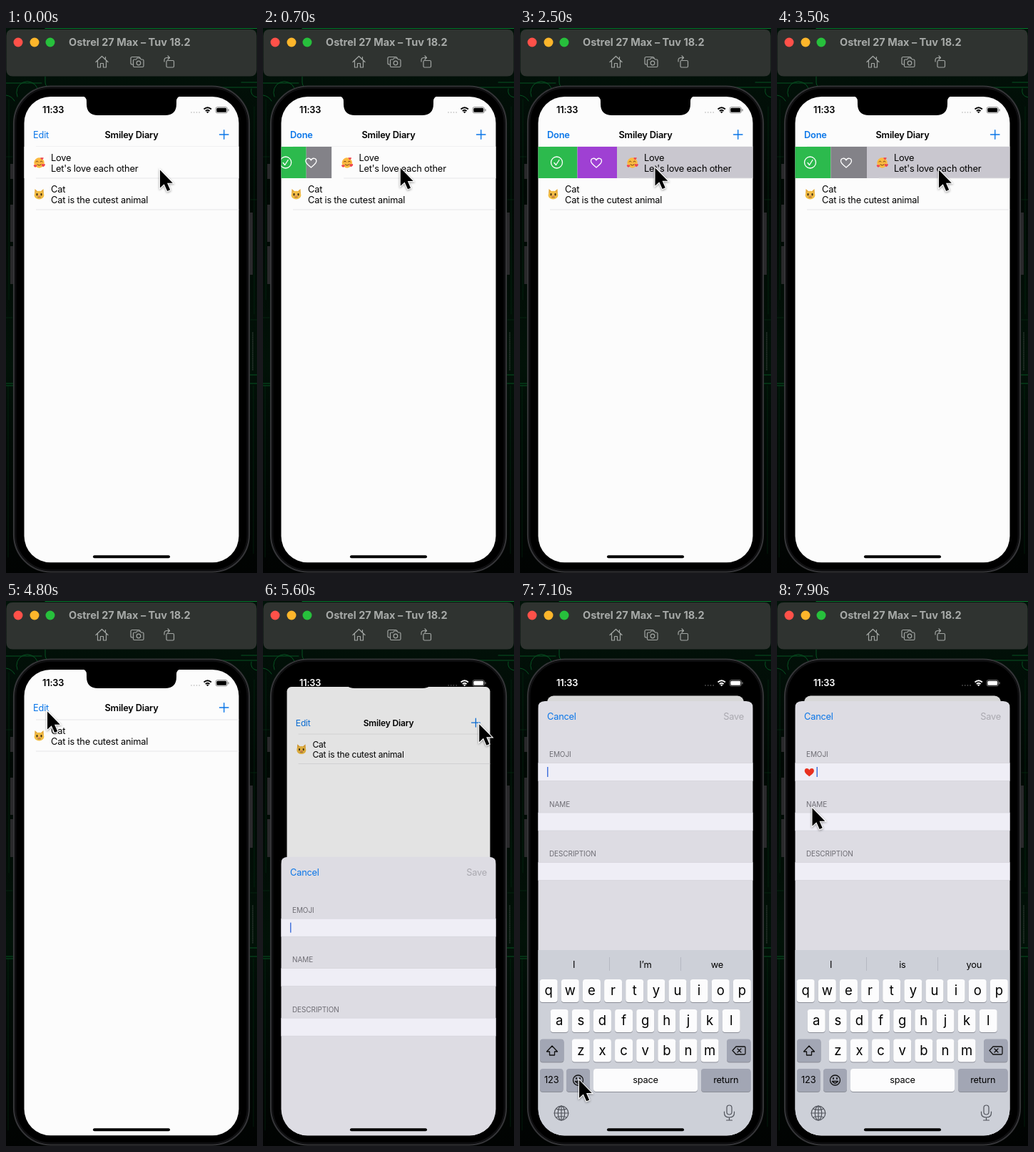
An HTML page for the animation above (8 s loop, 352x762 px).

```html
<!DOCTYPE html>
<html lang="en">
<head>
<meta charset="utf-8">
<title>Emoji list demo</title>
<style>
html, body { margin: 0; width: 352px; height: 762px; overflow: hidden; background: #000; }
svg { display: block; }
text { font: 12.8px Inter, "Open Sans", sans-serif; letter-spacing: -.2px; }
.bold { font-weight: 600; }
.blue { fill: #0a76e8; }
.mid { text-anchor: middle; }
.label { font-size: 10px; fill: #6e6d74; letter-spacing: -.1px; }
.key { font-size: 18.5px; letter-spacing: 0; }
.line { fill: none; stroke-linecap: round; stroke-linejoin: round; }
.sep { stroke: #dfdfe1; stroke-width: .8; }
</style>
</head>
<body>
<svg width="352" height="762" viewBox="0 0 352 762">
  <defs>
    <clipPath id="screen"><rect x="25.500" y="96" width="301" height="651.300" rx="37"/></clipPath>
    <linearGradient id="glow" x2="0" y2="1">
      <stop offset="0" stop-color="#02140a"/><stop offset=".3" stop-color="#010804"/>
      <stop offset=".62" stop-color="#021208"/><stop offset=".7" stop-color="#010d06"/>
      <stop offset="1" stop-color="#010302"/>
    </linearGradient>
    <path id="heart" d="M0 6.5C-3 4-7.5 1-7.5-2.4C-7.5-7-1.8-7.6 0-3.5C1.8-7.6 7.5-7 7.5-2.4C7.5 1 3 4 0 6.5Z"/>
  </defs>

  <!-- desktop -->
  <rect width="352" height="762" fill="url(#glow)"/>
  <g class="line" stroke="#075222">
    <path d="M55 .5H352" stroke="#0a7a30"/>
    <path d="M0 77H50M55 68v8q0 7 8 7H352M16 96a15 15 0 0 1 28-12M0 94q8 1 12 8M344 85q-2 10 8 12M330 76h22M0 497H11M341 497h11M0 500h11M341 485h11"/>
    <path d="M4 100V380M348 110V400M3 500V740M347 500V735M0 180h9M343 240h9M0 405h9M343 408h9" opacity=".3"/>
    <path d="M346 426v54" stroke="#3a443d" stroke-width="2" stroke-dasharray="1 2" opacity=".5"/>
  </g>

  <!-- window bar -->
  <path d="M.5 11Q.5 2 9.500 2H342.500Q351.500 2 351.500 11V58.500q0 9-9 9H9.500q-9 0-9-9Z" fill="#2f3330"/>
  <circle cx="17" cy="20" r="6.500" fill="#ff5149"/>
  <circle cx="40" cy="20" r="6.500" fill="#fdb62b"/>
  <circle cx="62" cy="20" r="6.500" fill="#27c03c"/>
  <text x="88" y="25" style="font-size:14.5px;font-weight:700;letter-spacing:0" fill="#a7aaa8">Ostrel 27 Max – Tuv 18.2</text>
  <g class="line" stroke="#a2a6a3" stroke-width="1.200">
    <path d="M126 47.500 134.500 39.500 143 47.500M128.500 46V55H132.500V49.500H136.500V55H140.500V46M139.500 43.500V40.500"/>
    <path d="M178 51h-1q-2 0-2-2v-6.500q0-2 2-2h9q2 0 2 2"/>
    <path d="M180 44h2.500l1.500-2h4l1.500 2h2q1.500 0 1.500 1.500v7.500q0 1.500-1.500 1.500h-11.500q-1.500 0-1.500-1.500v-7.500q0-1.500 1.500-1.500Z"/>
    <circle cx="186" cy="49" r="2.800"/>
    <path d="M226.500 45.500h7.500q1.500 0 1.500 1.500v6.500q0 1.500-1.500 1.500h-7.500q-1.500 0-1.500-1.500v-6.500q0-1.500 1.500-1.500ZM222 47v-2q0-3.500 4-3.500h3M227 39l2.500 2.500-2.500 2.500"/>
  </g>

  <!-- phone -->
  <path d="M8 190v21M8 247v52M8 305v53M344 258v87" stroke="#29292b" stroke-width="4"/>
  <rect x="11" y="81.500" width="330" height="679" rx="52" fill="#000" stroke="#343437" stroke-width="2.200"/>
  <rect x="13.500" y="84" width="325" height="674" rx="49" fill="none" stroke="#121214" stroke-width="1.500"/>

  <g clip-path="url(#screen)">
    <g id="list">
      <rect id="page" x="25" y="96" width="302" height="700" fill="#fcfcfc"/>
      <text id="edit" class="blue" x="38" y="154"></text>
      <text class="bold mid" x="176" y="154">Smiley Diary</text>
      <path class="line" d="M299.500 149h12.500M305.750 142.750v12.500" stroke="#0a76e8" stroke-width="1.400"/>
      <path class="sep" d="M42 166H327"/>
      <g id="love">
        <rect id="check" x="25" y="166" height="44" fill="#2cba4d"/>
        <rect id="fav" y="166" height="44"/>
        <g id="checkIcon" class="line" stroke="#fff" stroke-width="1.300">
          <circle r="8"/><path d="M-3.500.5-1 3.500 3.500-3.500"/>
        </g>
        <use id="favIcon" href="#heart" class="line" stroke="#fff" stroke-width="1.300"/>
        <g id="loveRow">
          <rect id="shade" x="25" y="166" width="302" height="44"/>
          <path class="sep" d="M42 210H327"/>
          <g transform="translate(46.500 188.500)">
            <circle r="7.200" fill="#fbb940"/>
            <path class="line" d="M-4.500-1.500q1.500-2 3 0M1.500-1.500q1.500-2 3 0M-2.500 2.500q2.500 2.500 5 0" stroke="#6b3d12"/>
            <g fill="#ee4450">
              <use href="#heart" transform="translate(-5.500 4.500)scale(.3)"/>
              <use href="#heart" transform="translate(5.800 3.500)scale(.34)"/>
              <use href="#heart" transform="translate(4 -5.800)scale(.27)"/>
            </g>
          </g>
          <text x="63" y="185.500">Love</text>
          <text x="63" y="201">Let's love each other</text>
        </g>
      </g>
      <g id="catRow">
        <path class="sep" d="M42 254H327"/>
        <g transform="translate(46.500 232.500)">
          <path d="M-6.500 0-6-7.500-2 -4H2L6-7.500 6.500 0Z" fill="#e5a93a"/>
          <ellipse cy="1.200" rx="6.900" ry="5.900" fill="#f2bd45"/>
          <path d="M-3-.5v1.500M3-.5v1.500" class="line" stroke="#3b2a12" stroke-width="2"/>
          <path d="M-2 4q1 1.200 2 0 1 1.200 2 0" class="line" stroke="#75501b" stroke-width=".8"/>
          <circle cy="2.700" r=".9" fill="#e5637a"/>
        </g>
        <text x="63" y="229.500">Cat</text>
        <text x="63" y="245">Cat is the cutest animal</text>
      </g>
      <rect id="dim" x="25" y="96" width="302" height="700"/>
    </g>

    <g id="sheet">
      <path d="M25 760V150q0-10 10-10H317q10 0 10 10V760Z" fill="#dddce3"/>
      <text class="blue" x="38" y="166">Cancel</text>
      <text x="314" y="166" text-anchor="end" fill="#aaa9b0">Save</text>
      <g id="fields"></g>
      <use id="red" href="#heart" transform="translate(45.300 239.500)scale(.88)" fill="#e8301f"/>
      <rect id="caret" y="232" width="1.500" height="14" fill="#4674dc"/>
      <g id="keyboard">
        <rect x="25" y="488" width="302" height="270" fill="#cdd0d8"/>
        <path d="M125.500 498v19M225.500 498v19" stroke="#b5b8c1"/>
        <g id="words"></g>
        <g id="keys"></g>
        <g class="line" stroke="#111" stroke-width="1.300">
          <path d="M45 622 52.500 630H48.500V635H41.500V630H37.500Z"/>
          <path d="M303 623h11.500q1.500 0 1.500 1.500v8q0 1.500-1.500 1.500H303l-5-5.500ZM305 626l5 5M310 626l-5 5"/>
          <circle cx="81.500" cy="670" r="7"/>
          <path d="M77.500 671.500q4 5.500 8 0Z"/>
          <path d="M79 667v1M84 667v1" stroke-width="1.800"/>
        </g>
        <g class="line" stroke="#50535b" stroke-width="1.200">
          <circle cx="58" cy="716" r="9.800"/><ellipse cx="58" cy="716" rx="4.700" ry="9.800"/>
          <path d="M48.200 716h19.600M58 706.200v19.600M50.500 710q7.500 3 15 0M50.500 722q7.500-3 15 0"/>
          <rect x="290" y="705" width="7" height="13" rx="3.500"/>
          <path d="M286.500 714v2q0 6 7 6t7-6v-2M293.500 722v4M289.500 726h8"/>
        </g>
      </g>
    </g>
    <rect x="122" y="737.200" width="108" height="4" rx="2"/>
  </g>

  <path d="M105 95q8 0 8 8v3q0 16 16 16h94q16 0 16-16v-3q0-8 8-8Z"/>
  <g id="status">
    <text class="bold" x="51" y="119" fill="currentColor">11:33</text>
    <path class="line" d="M260 118h12" stroke="#999" stroke-width="1.600" stroke-dasharray=".1 3.600" opacity=".7"/>
    <path class="line" d="M277.500 113.500q5.200-4.500 10.400 0M279.800 116q2.900-2.500 5.800 0" stroke="currentColor" stroke-width="1.800" style="stroke-linecap:butt"/>
    <path d="M280.900 117.300q1.800-1.500 3.600 0l-1.800 2Z" fill="currentColor"/>
    <rect x="294" y="110.500" width="16.500" height="8.500" rx="2.600" fill="none" stroke="currentColor" stroke-width=".8" opacity=".5"/>
    <rect x="295.300" y="111.800" width="13.900" height="5.900" rx="1.500" fill="currentColor"/>
    <path d="M312 113.300v3" stroke="currentColor" opacity=".6"/>
  </g>

  <path id="cursor" d="M1 1.500V26.500L6.800 21.200 11.200 31 15.200 29.300 11 19.700H18.800Z" stroke="#fff" stroke-width="2.200" style="paint-order:stroke;filter:drop-shadow(0 1px 1.500px #0006)"/>
</svg>
<script>
const $ = id => document.getElementById(id);
const set = (id, attrs) => { for (const k in attrs) $(id).setAttribute(k, attrs[k]); };
const move = (id, x, y) => set(id, { transform: `translate(${x} ${y})` });
const clamp = v => Math.max(0, Math.min(1, v));
const smooth = v => v * v * (3 - 2 * v);
const easeOut = v => 1 - (1 - v) ** 3;
const span = (t, a, b) => clamp((t - a) / (b - a));

// Interpolates rows of [time, ...values].
function track(rows, t) {
  let i = rows.findIndex(r => r[0] > t);
  if (i < 0) return rows.at(-1).slice(1);
  const a = rows[i - 1], b = rows[i], p = smooth(span(t, a[0], b[0]));
  return a.slice(1).map((v, n) => v + (b[n + 1] - v) * p);
}

const pointer = [
  [0, 215, 197], [400, 130, 195], [900, 225, 194], [1400, 219.5, 194], [1800, 88, 190], [2150, 80, 192],
  [2500, 188.5, 194], [2650, 195, 194], [3000, 88, 190], [3200, 125, 195], [3500, 226, 197], [3650, 228, 197],
  [4050, 42, 188], [4350, 42, 186], [4800, 57, 153], [5250, 304, 150], [5500, 304, 150], [6200, 272.5, 516],
  [6700, 82, 670], [7250, 82, 668], [7900, 48.5, 288], [8000, 48.5, 290]
];
const swipe = [
  [0, 0], [400, 0], [850, 96], [1050, 88], [1850, 88], [2100, 0], [2200, 0], [2500, 111], [2650, 114],
  [2800, 88], [3030, 88], [3200, 0], [3250, 0], [3500, 101], [3750, 88], [4080, 88], [4300, 0], [8000, 0]
];

["EMOJI", "NAME", "DESCRIPTION"].forEach((name, i) => {
  const y = 69.5 * i;
  $("fields").innerHTML += `<text class="label" x="41" y="${218 + y}">${name}</text>
    <rect x="25" y="${226.5 + y}" width="302" height="25" fill="#efeef6" stroke="#d0cfd6" stroke-width=".6"/>`;
});

function key(x, y, w, label = "", dark = false) {
  const cls = label.length > 1 ? "mid" : "mid key";
  $("keys").innerHTML += `<rect x="${x}" y="${y + 1}" width="${w}" height="32" rx="4" fill="#8b8e97"/>
    <rect x="${x}" y="${y}" width="${w}" height="32" rx="4" fill="${dark ? "#a2a6b4" : "#fcfcfd"}"/>
    <text class="${cls}" x="${x + w / 2}" y="${y + (label.length > 1 ? 20 : 22)}">${label}</text>`;
}
[["qwertyuiop", 27.7, 529], ["asdfghjkl", 42.7, 571], ["zxcvbnm", 72.8, 612.5]].forEach(([row, x, y]) =>
  [...row].forEach((c, i) => key(x + 30.13 * i, y, 25, c)));
key(28, 612.5, 33.5, "", true);
key(290, 612.5, 33.5, "", true);
key(28, 654, 32.5, "123", true);
key(65, 654, 33, "", true);
key(103, 654, 146, "space");
key(254, 654, 69.5, "return", true);

let shown;
function suggest(words) {
  if (shown === words) return;
  shown = words;
  $("words").innerHTML = words.split(" ").map((w, i) =>
    `<text class="mid" x="${75.5 + 100.4 * i}" y="512.500">${w}</text>`).join("");
}

function draw(now) {
  const t = now % 8000;
  move("cursor", ...track(pointer, t));

  const [dx] = track(swipe, t), half = dx / 2, open = dx > 1;
  const held = (t > 2200 && t < 2750) || (t > 3250 && t < 3700);
  move("loveRow", dx, 0);
  set("check", { width: half });
  set("fav", { x: 25 + half, width: half, fill: t > 1850 && t < 3030 ? "#9f40d3" : "#838288" });
  move("checkIcon", half - 4, 188);
  move("favIcon", dx - 4, 188.5);
  set("checkIcon", { opacity: clamp(half / 30) });
  set("favIcon", { opacity: clamp(half / 30) });
  set("shade", { fill: held ? "#c9c7cf" : "#fcfcfc" });
  $("edit").textContent = open ? "Done" : "Edit";
  set("edit", { class: open ? "blue bold" : "blue" });

  const gone = smooth(span(t, 4250, 4550));
  set("love", { opacity: 1 - gone });
  move("catRow", 0, -44 * gone);

  // The list shrinks back while the form slides up.
  const up = easeOut(span(t, 5450, 5950)), s = 1 - .086 * up;
  set("list", { transform: `translate(${176 * (1 - s)} ${96 * (1 - s) + 36.5 * up}) scale(${s})` });
  set("page", { rx: up * 10 });
  set("dim", { rx: up * 10, opacity: .15 * up });
  move("sheet", 0, 640 * (1 - up));
  move("keyboard", 0, 270 * (1 - easeOut(span(t, 5500, 6050))));
  $("status").style.color = t > 5500 ? "#fff" : "#000";

  const typed = t >= 7250;
  set("red", { opacity: +typed });
  set("caret", { x: typed ? 55.5 : 38 });
  suggest(typed ? "I is you" : "I I’m we");
  requestAnimationFrame(draw);
}
requestAnimationFrame(draw);
</script>
</body>
</html>
```
